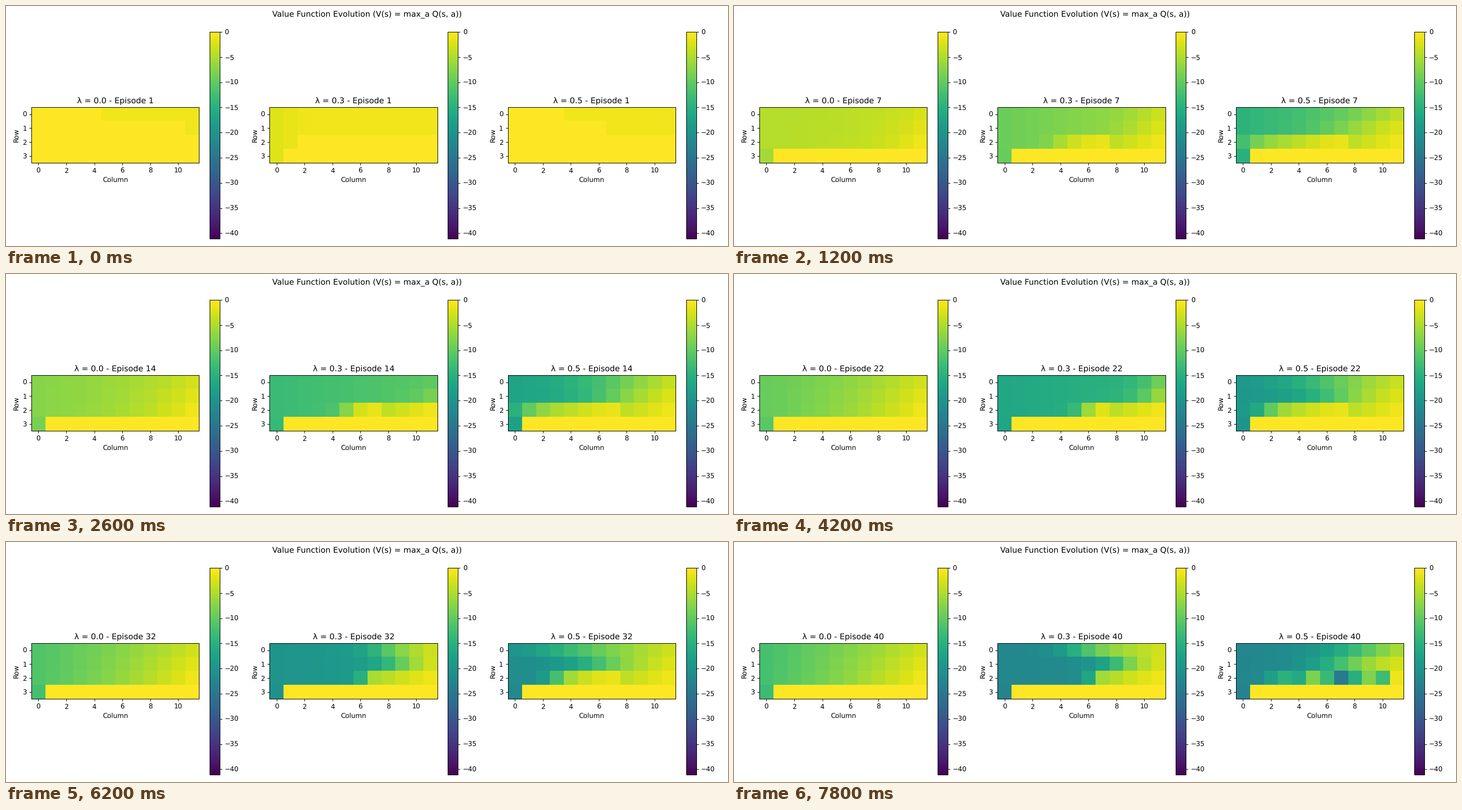
A matplotlib script that plays this animation: 1280 by 427 pixels, repeating every 8 s.

```python
import numpy as np
import matplotlib.pyplot as plt
from matplotlib.animation import FuncAnimation

W, H = 1280, 427
DPI = 256 / 3
ROWS, COLS = 4, 12
EPISODES = 40
V_MIN = -41.1
COL = np.arange(COLS)
ROW = np.arange(3)[:, None]

plt.rcParams["text.hinting"] = "none"

# Steps to the goal, and the smaller costs seen by the little-used cliff edge.
DIST = 14 - COL - ROW * COL / 11
NEAR = np.vstack([
    14 - COL,
    13 - COL,
    np.where(COL < 8, np.maximum(8.5 - 1.1 * COL, 1.3), 12 - COL),
])

# Column where each row drops from the far cost to the near cost.
FRONT_EPISODES = (1, 14, 32, 40)
FRONTS_03 = ((5, 14, 7.5, 5), (6, 12, 8.6, 8), (2.5, 5, 6.5, 6.5))
FRONTS_05 = ((10, 6.5, 2.5, 7.8), (7, 6.5, 5.5, 6.5), (0, 0.5, 2.9, 2.5))


def grid(upper, start):
    """Full grid: three open rows, the start cell and the cliff at zero."""
    cost = np.zeros((ROWS, COLS))
    cost[:3] = upper
    cost[3, 0] = start
    return cost


def first_walk(top, middle, low):
    """Costs left by the first episode on the cells it crossed."""
    walked = np.vstack([COL >= top, COL >= middle, COL < low])
    step = 0.9 + 1.1 * np.exp(-COL)
    return grid(walked * step, 2 if low else 0)


def one_step(ep):
    """Costs grow steadily until they saturate at the distance to the goal."""
    reach = 0.55 * ep + 1
    cost = DIST * reach / np.hypot(DIST, reach)
    return grid(cost, cost[2, 0] + 1)


def traced(ep, reach, fronts, widths):
    """Far cost on the left falls to the near cost past a moving front."""
    front = np.array([[np.interp(ep, FRONT_EPISODES, f)] for f in fronts])
    share = 1 / (1 + np.exp((COL - front) / np.array(widths)[:, None]))
    far = reach * np.maximum(1 - 0.25 * COL / ep, 0.3)
    near = np.minimum(NEAR, far)
    return grid(near + (far - near) * share, 1.03 * reach)


def short_trace(ep):
    return traced(ep, 3.5 * np.sqrt(ep), FRONTS_03, (0.9, 0.9, 0.4))


def long_trace(ep):
    cost = traced(ep, 9 * ep ** 0.245, FRONTS_05, (1.8, 1.3, 0.5))
    # Late falls off the cliff shake the row above it, worst at column 7.
    late = np.clip((ep - 32) / 8, 0, 1)
    jolt = 8 + 3 * np.cos(np.pi * COL) + 18 * np.exp(-4 * (COL - 7) ** 2)
    cost[2, 3:11] += late * jolt[3:11]
    return cost


PANELS = [
    ("0.0", one_step, first_walk(5, 11, 0)),
    ("0.3", short_trace, first_walk(0, 0, 2)),
    ("0.5", long_trace, first_walk(4, 7, 0)),
]


def values(model, first, ep):
    mix = min((ep - 1) / 3, 1)
    return -(first + (model(ep) - first) * mix)


fig = plt.figure(figsize=(W / DPI, H / DPI), dpi=DPI)
fig.suptitle("Value Function Evolution (V(s) = max_a Q(s, a))", fontsize=11.9)


def place(x, y, w, h):
    """Axes from a pixel box measured from the top left."""
    return fig.add_axes([x / W, 1 - (y + h) / H, w / W, h / H])


images, titles = [], []
for i, (lam, model, first) in enumerate(PANELS):
    x = 45.1 + 422.3 * i
    ax = place(x, 180.3, 297.2, 297.2 / 3)
    im = ax.imshow(-first, cmap="viridis", vmin=V_MIN, vmax=0)
    ax.set_xticks(range(0, COLS, 2))
    ax.set_yticks(range(ROWS))
    ax.set_xlabel("Column")
    ax.set_ylabel("Row")
    titles.append(ax.set_title(""))
    images.append(im)
    bar = place(x + 315.95, 46, 18.1, 368.2)
    fig.colorbar(im, cax=bar, ticks=range(-40, 1, 5))


def draw(frame):
    ep = frame + 1
    for (lam, model, first), im, title in zip(PANELS, images, titles):
        im.set_data(values(model, first, ep))
        title.set_text(f"λ = {lam} - Episode {ep}")
    return images + titles


anim = FuncAnimation(fig, draw, frames=EPISODES, interval=200, repeat=True, blit=False)
plt.show()
```
